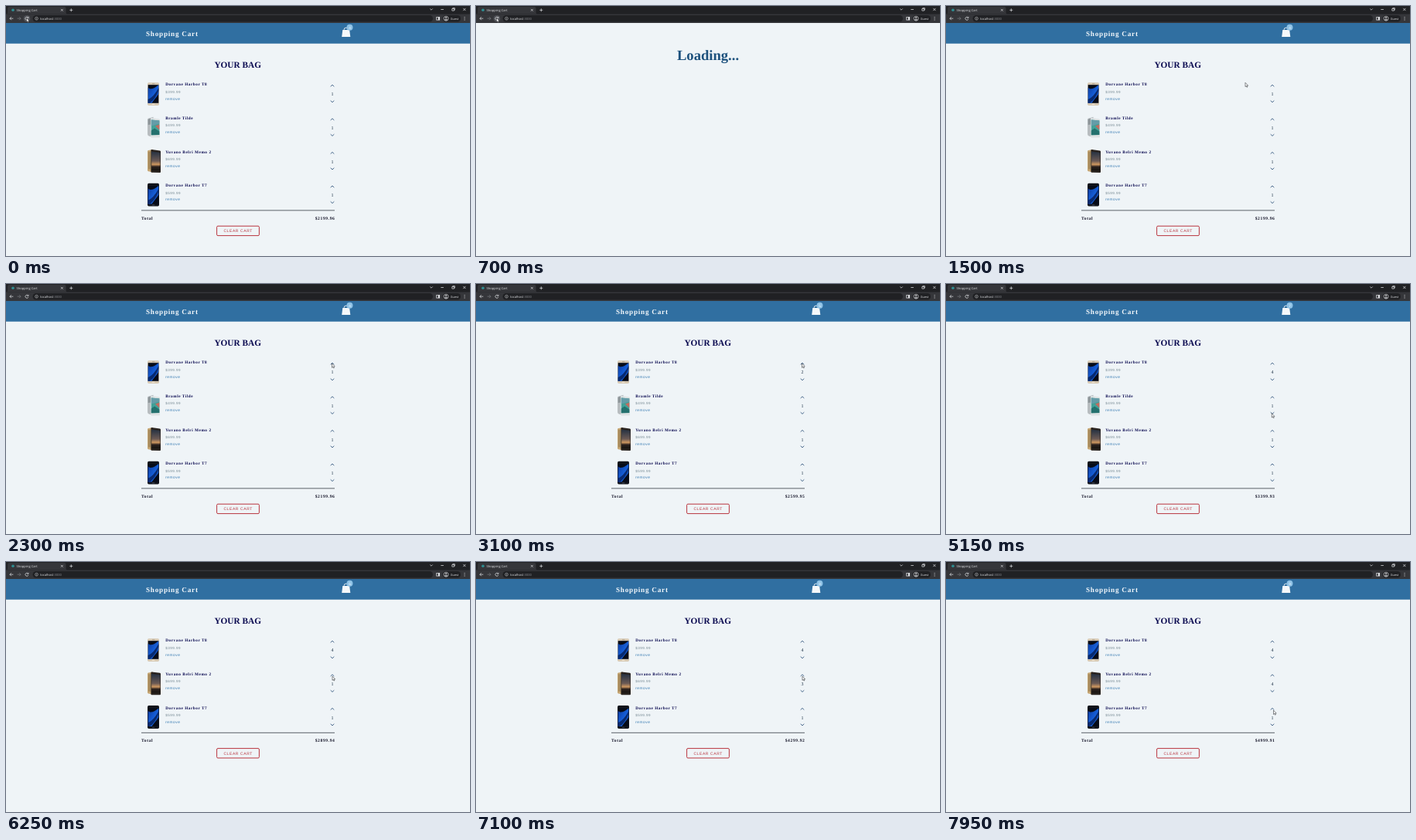
Animation, 600 px wide and 324 px high, one loop 8000 ms. Source, as an HTML page:

```html
<!DOCTYPE html>
<html lang="en">
<head>
<meta charset="utf-8">
<title>Shopping Cart</title>
<style>
  html, body { margin: 0; width: 100%; height: 100%; overflow: hidden; background: #eff4f7; }
  svg { display: block; width: 600px; height: 324px; }
  text { text-rendering: geometricPrecision; white-space: pre; }
  .serif { font-family: "Liberation Serif", "Times New Roman", serif; font-weight: bold; }
  .sans { font-family: "Liberation Sans", Arial, sans-serif; }
  .ui { font-family: "Open Sans", "Noto Sans", sans-serif; font-size: 4.1px; fill: #e4e6e9; }
  .line { fill: none; stroke: #d8dadd; stroke-width: .75; }
  .name { font-size: 5.25px; letter-spacing: .55px; fill: #08084f; }
  .price { font-size: 4.5px; letter-spacing: .5px; fill: #768993; }
  .remove { font-size: 4.8px; letter-spacing: .55px; fill: #3579b1; }
  .qty { font-family: "Liberation Serif", serif; font-size: 6px; fill: #182c42; text-anchor: middle; }
  .chevron { fill: none; stroke: #35597f; stroke-width: .9; }
  .sum { font-size: 5.6px; letter-spacing: .6px; fill: #141428; }
</style>
</head>
<body>
<svg viewBox="0 0 600 324">
  <defs>
    <linearGradient id="dusk" x2="0" y2="1">
      <stop offset="0" stop-color="#253142"/>
      <stop offset=".5" stop-color="#6b5a55"/>
      <stop offset=".68" stop-color="#cf9860"/>
      <stop offset=".8" stop-color="#2b211e"/>
      <stop offset="1" stop-color="#15130f"/>
    </linearGradient>
    <linearGradient id="blue" x2="1" y2="1">
      <stop offset="0" stop-color="#0b3a9c"/>
      <stop offset=".6" stop-color="#1762dd"/>
      <stop offset="1" stop-color="#0a3184"/>
    </linearGradient>
    <g id="swirl">
      <rect x="183.7" y="102.2" width="13.6" height="23.6" fill="#060b18"/>
      <path d="M183.7 105.5C186 109 192 107 197.3 102.2V114C194 119 191 122 188.5 125.8H183.7Z" fill="url(#blue)"/>
      <path d="M183.7 121Q191 118 197.3 106V110Q192 122 186 125.8H183.7Z" fill="#082a70"/>
    </g>
    <g id="phone0">
      <rect x="183" y="99.2" width="15" height="29.8" rx="1.7" fill="#d6c8b2"/>
      <use href="#swirl"/>
      <rect x="188.7" y="126.7" width="3.6" height="1.1" rx=".5" fill="#f1e8da"/>
      <path d="M189 100.7h3.4" stroke="#867b6c" stroke-width=".5"/>
    </g>
    <g id="phone1">
      <path d="M183.8 102.2 190.5 100.2V126.6L184.2 124.6Q183 124 183 122.5V103.3Z" fill="#b8bdc0"/>
      <path d="M183.7 103.2 188 101.8V110L183.7 110.5Z" fill="#8f979b"/>
      <path d="M188 101.4 198 102.8Q199 103 199 104V125.8Q199 127 197.8 127L188 126.8Q187 126.8 187 125.5V102.5Q187 101.4 188 101.4Z" fill="#dee2e3"/>
      <path d="M187.8 104 198.3 105V123.3L187.8 123.6Z" fill="#41a097"/>
      <path d="M187.8 104 198.3 105V109L187.8 112Z" fill="#659ca8"/>
      <path d="M187.8 118 192 115 198.3 119V123.3L187.8 123.6Z" fill="#24716e"/>
      <path d="M193 112 198.3 110V117Z" fill="#c16b60"/>
    </g>
    <g id="phone2">
      <path d="M184 99.8 190 98.8V128.2L184 127Q183 126.7 183 125.5V101Q183 100 184 99.8Z" fill="#c5a573"/>
      <path d="M184 101.8 187 101.4V124.5L184 124Z" fill="#a68a5e"/>
      <path d="M188.4 98.8 199 100.2Q200 100.4 200 101.5V127.5Q200 128.7 199 128.7L188.4 128.6Q187.4 128.6 187.4 127.4V100Q187.4 98.8 188.4 98.8Z" fill="#29231f"/>
      <path d="M188.2 101.5 199.4 102.7V126L188.2 126Z" fill="url(#dusk)"/>
    </g>
    <g id="phone3">
      <rect x="183" y="98.9" width="15" height="29.8" rx="1.7" fill="#10131b"/>
      <use href="#swirl"/>
      <rect x="188.7" y="126.5" width="3.6" height="1.1" rx=".5" fill="#3b414c"/>
    </g>
  </defs>

  <rect width="600" height="324" fill="#eff4f7"/>

  <g id="cart">
    <rect y="21" width="600" height="27.7" fill="#306fa1"/>
    <text class="serif" x="181" y="38.6" font-size="9.2" letter-spacing=".75" fill="#f1f6fa">Shopping Cart</text>
    <path d="M435.3 31h8.9l1.1 8.9h-11.1Z" fill="#f5f8fa"/>
    <path d="M437.2 32.5v-2.2q0-2.1 2.5-2.1t2.5 2.1v2.2" fill="none" stroke="#f5f8fa" stroke-width=".9"/>
    <circle cx="444.5" cy="27.8" r="4" fill="#8ec2e6"/>
    <text class="sans" id="count" x="444.5" y="29.5" font-size="4.8" text-anchor="middle" fill="#f4f9fc"></text>
    <text class="serif" x="299.7" y="80.2" font-size="11.3" text-anchor="middle" fill="#0a0a50">YOUR BAG</text>
    <g id="rows"></g>
    <g id="footer">
      <path d="M175 264.9H425" stroke="#4b5158" stroke-width=".9"/>
      <text class="serif sum" x="175" y="277">Total</text>
      <text class="serif sum" id="total" x="425.5" y="277" text-anchor="end"></text>
      <rect x="272.6" y="285.2" width="54.8" height="12.4" rx="1.4" fill="none" stroke="#b9343e" stroke-width="1"/>
      <text class="sans" x="300.2" y="293.2" font-size="5" letter-spacing=".6" text-anchor="middle" fill="#b9343e">CLEAR CART</text>
    </g>
  </g>

  <text class="serif" id="loading" x="300" y="70.3" font-size="18.6" text-anchor="middle" fill="#1d517d">Loading...</text>

  <g id="browser">
    <rect width="600" height="22" fill="#35363a"/>
    <rect width="600" height="10.5" fill="#202124"/>
    <path d="M0 10.5Q2 10.5 2 8.5V3Q2 1 4 1H75.500Q77.500 1 77.500 3V8.500Q77.500 10.500 79.500 10.500Z" fill="#35363a"/>
    <circle cx="9" cy="5.3" r="1.8" fill="#2f8f92"/>
    <text class="ui" x="13.6" y="6.8" font-size="4">Shopping Cart</text>
    <path class="line" d="M71 3.900l2.800 2.800m0-2.800l-2.800 2.800M82.300 5.300h4m-2-2v4"/>
    <path class="line" d="M548.300 3.500l1.700 1.700 1.700-1.700M562.300 4.500h3.600M591.200 2.900l3.200 3.200m0-3.200l-3.200 3.200"/>
    <path class="line" d="M576.800 3.500h2.600v2.600h-2.600ZM577.700 3.300v-.7h2.600v2.600h-.7"/>
    <rect x="34.500" y="11.900" width="517.500" height="8.600" rx="4.300" fill="#202124"/>
    <path class="line" d="M9.400 16.200h-4.500m2-2l-2 2 2 2"/>
    <path class="line" d="M14.600 16.200h4.500m-2-2l2 2-2 2" style="stroke:#777a7e"/>
    <circle id="hover" cx="27" cy="16.200" r="4.300" fill="#505257"/>
    <path class="line" d="M28.700 15.200a2 2 0 1 0 .2 1.700M29 13.800v1.700h-1.700"/>
    <circle class="line" cx="39.500" cy="16.200" r="1.900" style="stroke-width:.5"/>
    <path class="line" d="M39.500 16v1.200m0-2.200v.4" style="stroke-width:.5"/>
    <text class="ui" x="44.300" y="17.700">localhost<tspan fill="#8d9196">:3000</tspan></text>
    <rect class="line" x="556.700" y="14.400" width="4" height="3.700"/>
    <rect x="558.800" y="14.400" width="2" height="3.700" fill="#e4e6e9"/>
    <rect x="564.500" y="11.900" width="23.500" height="8.600" rx="4.300" fill="#202124"/>
    <circle cx="569" cy="16.200" r="3" fill="#202124" stroke="#d8dadd" stroke-width=".7"/>
    <circle cx="569" cy="15.300" r="1" fill="#d8dadd"/>
    <path d="M567 18q2-2.200 4 0-2 1.200-4 0" fill="#d8dadd"/>
    <text class="ui" x="574.800" y="17.600" style="font-size:3.800px">Guest</text>
    <path d="M593 14.100v4.500" stroke="#d8dadd" stroke-width=".9" stroke-dasharray=".9"/>
  </g>

  <path id="cursor" d="M0 0V5.300L1.200 4.200 2 6 2.900 5.600 2.100 3.900H3.700Z" fill="#fff" stroke="#16181c" stroke-width=".5"/>
</svg>

<script>
  const LOOP = 8000;
  const PITCH = 43.6;
  const LOADING = [300, 1050];
  const $ = id => document.getElementById(id);

  // "clicks" raise the quantity by one; "removed" takes the item out of the bag.
  const items = [
    { name: "Dorvane Harbor T8", price: 399.99, clicks: [2600, 3400, 4050] },
    { name: "Bramle Tilde", price: 499.99, clicks: [], removed: 5500 },
    { name: "Yuvano Belri Memo 2", price: 699.99, clicks: [6450, 6800, 7200] },
    { name: "Dorvane Harbor T7", price: 599.99, clicks: [] }
  ];

  // Time, x and y of the pointer tip.
  const path = [
    [0, 26.5, 15.5], [800, 26.5, 15.5], [1500, 387, 99.3], [2150, 421.5, 103],
    [4250, 421.5, 103], [4900, 421.3, 167.7], [5650, 421.3, 167.7],
    [6150, 422, 148], [7400, 422, 148], [7850, 423.5, 192.2], [LOOP, 423.5, 192.2]
  ];

  $("rows").innerHTML = items.map((item, i) => `
    <g>
      <use href="#phone${i}"/>
      <text class="serif name" x="206.2" y="103.4">${item.name}</text>
      <text class="sans price" x="206.2" y="112.8">$${item.price}</text>
      <text class="sans remove" x="206.2" y="121.7">remove</text>
      <path class="chevron" d="M419.700 104.400l2.300-2.200 2.300 2.200M419.700 122.600l2.300 2.200 2.300-2.200"/>
      <text class="qty" x="422" y="116.400"></text>
    </g>`).join("");
  const rows = [...$("rows").children];
  const quantities = rows.map(row => row.querySelector(".qty"));

  const show = (node, visible) => { node.style.display = visible ? "" : "none"; };
  const move = (node, x, y) => node.setAttribute("transform", `translate(${x} ${y})`);

  function pointerAt(t) {
    const next = path.findIndex(point => point[0] > t);
    const [t0, x0, y0] = path[next - 1];
    const [t1, x1, y1] = path[next];
    const p = (t - t0) / (t1 - t0);
    const ease = p * p * (3 - 2 * p);
    return [x0 + (x1 - x0) * ease, y0 + (y1 - y0) * ease];
  }

  function draw(t) {
    const loading = t >= LOADING[0] && t < LOADING[1];
    show($("cart"), !loading);
    show($("loading"), loading);

    let slot = 0, count = 0, total = 0;
    items.forEach((item, i) => {
      const present = t < (item.removed ?? Infinity);
      show(rows[i], present);
      if (!present) return;
      const quantity = 1 + item.clicks.filter(time => time <= t).length;
      quantities[i].textContent = quantity;
      move(rows[i], 0, PITCH * slot++);
      count += quantity;
      total += quantity * item.price;
    });
    $("count").textContent = count;
    $("total").textContent = "$" + total.toFixed(2);
    move($("footer"), 0, PITCH * (slot - items.length));

    const [x, y] = pointerAt(t);
    move($("cursor"), x, y);
    show($("hover"), Math.hypot(x - 27, y - 16.2) < 4.3);
  }

  const start = performance.now();
  function tick() {
    draw((performance.now() - start) % LOOP);
    requestAnimationFrame(tick);
  }
  tick();
</script>
</body>
</html>
```
